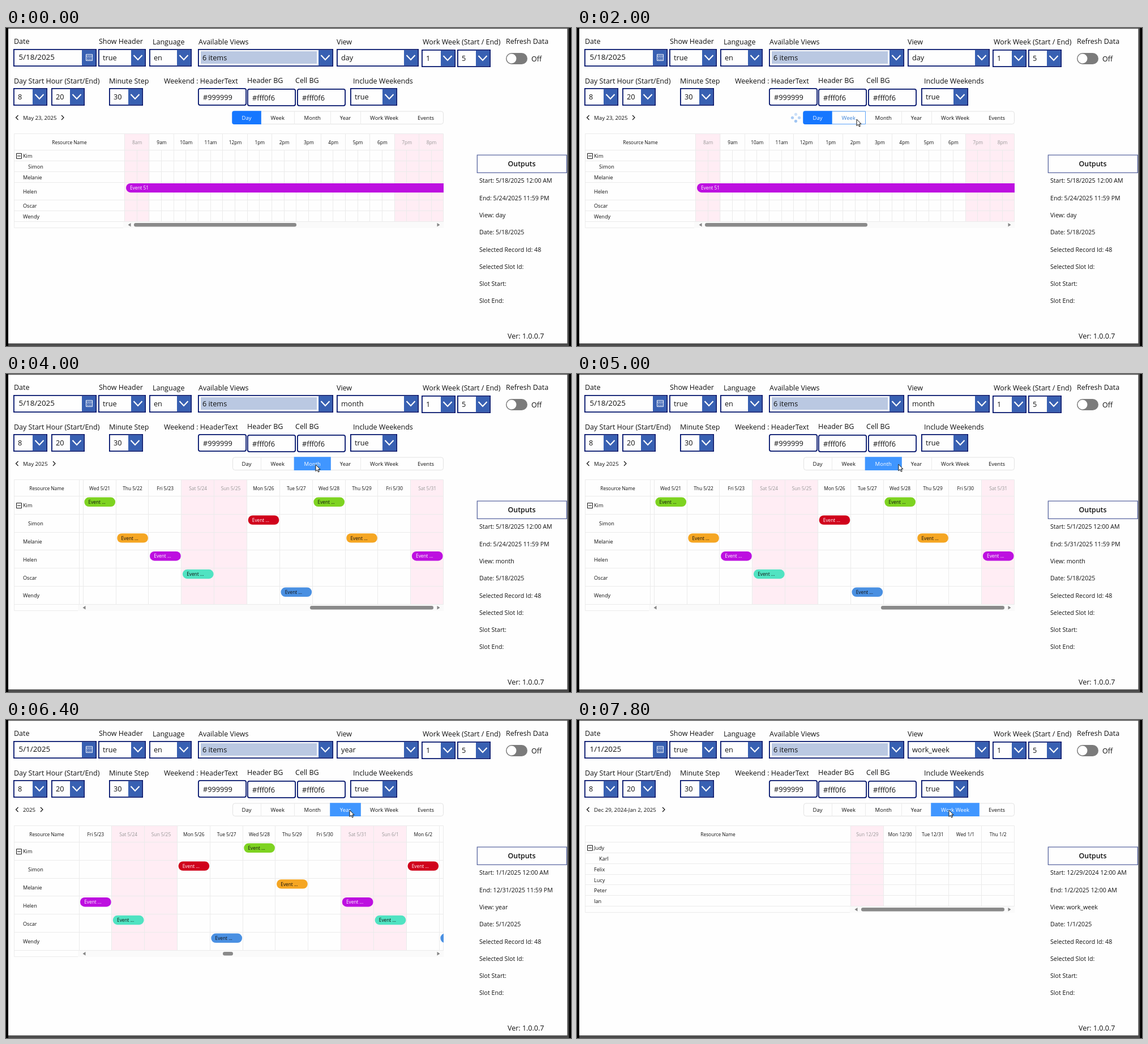
An HTML page with a canvas for the animation above (8 s loop, 998 px wide and 561 px high).

```html
<!DOCTYPE html>
<html lang="en">
<head>
<meta charset="utf-8">
<title>Scheduler views</title>
<style>
  html, body { margin: 0; width: 100%; height: 100%; overflow: hidden; background: #fefefe; }
  canvas { display: block; }
</style>
</head>
<body>
<canvas id="stage" width="998" height="561"></canvas>
<script>
const ctx = document.getElementById('stage').getContext('2d');
const LOOP = 8000;
const NAVY = '#00126b', BLUE = '#3860b2', LINE = '#ebebeb', PINK = '#ffedf4', INK = '#111';
const RIGHT = 773, HEAD_TOP = 187, BODY_TOP = 216;

const team = ['Kim', 'Simon', 'Melanie', 'Helen', 'Oscar', 'Wendy'];
const otherTeam = ['Judy', 'Karl', 'Felix', 'Lucy', 'Peter', 'Ian'];

// One entry per team row; days are counted from Sunday 18 May 2025.
const events = [
  { id: 49, color: '#7ed321', days: [3, 10] },
  { id: 47, color: '#d0021b', days: [0, 8, 15], light: true },
  { id: 50, color: '#f5a623', days: [4, 11] },
  { id: 51, color: '#bd10e0', days: [5, 13], light: true },
  { id: 52, color: '#50e3c2', days: [6, 14] },
  { id: 48, color: '#4a90e2', days: [1, 9, 16] }
];

const evenRows = height => Array.from({ length: 7 }, (_, i) => BODY_TOP + i * height);
const tall = evenRows(31.8), low = evenRows(18.85);

const DAY = { name: 'day', date: '5/18/2025', title: 'May 23, 2025', next: 100, left: 210, x0: 210, w: 43.32, n: 13,
  hours: true, rows: [216, 235, 254, 273, 304, 323, 342], names: team, thumb: [226, 513] };
const WEEK = { name: 'week', date: '5/23/2025', title: 'May 18-24, 2025', next: 116, left: 136, x0: 136, w: 90.95, n: 7,
  day0: 0, rows: tall, names: team };
const MONTH = { name: 'month', date: '5/18/2025', title: 'May 2025', next: 85, left: 130, x0: 136.7, w: 57.85, n: 11,
  day0: 3, rows: tall, names: team, thumb: [537, 755] };
const YEAR = { name: 'year', date: '5/1/2025', title: '2025', next: 63, left: 130, x0: 129.3, w: 57.85, n: 12,
  day0: 5, rows: tall, names: team, thumb: [383, 401] };
const WORK = { name: 'work_week', date: '1/1/2025', title: 'Dec 29, 2024-Jan 2, 2025', next: 153, left: 484, x0: 484,
  w: 57.7, n: 5, day0: -140, rows: low, names: otherTeam, thumb: [502, 755] };

const tabs = [['Day', 400, 450], ['Week', 450, 509.5], ['Month', 509.5, 573], ['Year', 573, 626],
  ['Work Week', 626, 710], ['Events', 710, 773]];

// Timelines: [start time, value]
const viewAt = [[0, DAY], [2400, WEEK], [3800, MONTH], [6000, YEAR], [7400, WORK]];
const tabAt = [[0, 0], [2200, 1], [3500, 2], [5400, 3], [7000, 4]];
const busyAt = [[0, false], [1800, true], [2400, false], [3400, true], [3800, false],
  [5300, true], [6000, false], [7000, true], [7400, false]];
const rangeAt = [
  [0, ['5/18/2025 12:00 AM', '5/24/2025 11:59 PM']],
  [4200, ['5/1/2025 12:00 AM', '5/31/2025 11:59 PM']],
  [6200, ['1/1/2025 12:00 AM', '12/31/2025 11:59 PM']],
  [7600, ['12/29/2024 12:00 AM', '1/2/2025 12:00 AM']]
];
const cursorPath = [[1200, 560, 330], [1800, 494, 161], [2800, 494, 161], [3200, 525, 171], [3500, 545, 160],
  [4000, 547, 160], [4800, 548, 160], [5300, 604, 158], [5600, 604, 158], [6400, 607, 159],
  [6700, 607, 159], [7000, 655, 159], [7800, 657, 159]];

const pick = (timeline, t) => timeline.findLast(([start]) => start <= t)[1];

function cursorPos(t) {
  const i = cursorPath.findLastIndex(([time]) => time <= t);
  if (i < 0) return null;
  const a = cursorPath[i], b = cursorPath[i + 1] || a;
  const p = a === b ? 0 : (t - a[0]) / (b[0] - a[0]);
  const ease = p * p * (3 - 2 * p);
  return [a[1] + (b[1] - a[1]) * ease, a[2] + (b[2] - a[2]) * ease];
}

// Hover strength of a tab, softened over the last 300 ms.
function hoverOf([, x1, x2], t) {
  let sum = 0;
  for (let k = 0; k < 6; k++) {
    const p = cursorPos(t - k * 60);
    if (p && p[0] >= x1 && p[0] < x2 && p[1] > 147 && p[1] < 170) sum++;
  }
  return sum / 6;
}

const mix = (a, b, p) => `rgb(${a.map((v, i) => Math.round(v + (b[i] - v) * p))})`;

function text(str, x, midY, size, { color = INK, align = 'left', weight = 400 } = {}) {
  ctx.font = `${weight} ${size}px "Open Sans", sans-serif`;
  ctx.fillStyle = color;
  ctx.textAlign = align;
  ctx.fillText(str, x, midY + size * 0.36);
}

function rect(x1, y1, x2, y2, color) {
  ctx.fillStyle = color;
  ctx.fillRect(x1, y1, x2 - x1, y2 - y1);
}

function pill(x, y, w, h, radius, color) {
  ctx.beginPath();
  ctx.roundRect(x, y, w, h, radius);
  ctx.fillStyle = color;
  ctx.fill();
}

function frame(x1, y1, x2, y2, color, width, radius = 0) {
  ctx.beginPath();
  ctx.roundRect(x1 + width / 2, y1 + width / 2, x2 - x1 - width, y2 - y1 - width, radius);
  ctx.strokeStyle = color;
  ctx.lineWidth = width;
  ctx.stroke();
}

function poly(points, color, width) {
  ctx.beginPath();
  points.forEach(([x, y]) => ctx.lineTo(x, y));
  ctx.strokeStyle = color;
  ctx.lineWidth = width;
  ctx.stroke();
}

const hLine = (x1, x2, y) => rect(x1, Math.round(y) - 1, x2, Math.round(y), LINE);
const vLine = (x, y1, y2) => rect(Math.round(x) - 1, y1, Math.round(x), y2, LINE);

function dot(x, y, r, color) {
  ctx.beginPath();
  ctx.arc(x, y, r, 0, Math.PI * 2);
  ctx.fillStyle = color;
  ctx.fill();
}

function dropdown(x1, y1, x2, value) {
  const cx = x2 - 14, cy = y1 + 15;
  frame(x1, y1, x2, y1 + 31, NAVY, 1.8);
  rect(x2 - 26, y1 + 2, x2 - 2, y1 + 29, BLUE);
  poly([[cx - 7.5, cy - 4], [cx, cy + 4], [cx + 7.5, cy - 4]], '#fff', 2.1);
  text(value, x1 + 8, cy + 0.5, 12.7);
}

function input(x, y, value) {
  frame(x, y, x + 86, y + 31, NAVY, 1.8, 3);
  text(value, x + 9, y + 16.5, 12.7);
}

function drawForm(view) {
  const labels = [['Date', 14, 23.5], ['Show Header', 164, 23.5], ['Language', 259, 24.5], ['Available Views', 340, 24.5],
    ['View', 584, 24.5], ['Work Week (Start / End)', 736, 24.5], ['Refresh Data', 883, 23.5],
    ['Day Start Hour (Start/End)', 14, 93.5], ['Minute Step', 182, 93.5], ['Weekend : HeaderText', 279, 93.5],
    ['Header BG', 426, 92.5], ['Cell BG', 511, 92.5], ['Include Weekends', 613, 93.5]];
  labels.forEach(([str, x, y]) => text(str, x, y, 12.5));

  frame(13, 37, 160, 68, NAVY, 1.8);
  rect(134, 39, 158, 66, BLUE);
  frame(141, 46, 153, 58, '#fff', 1);
  rect(141, 49, 153, 50, '#fff');
  for (let i = 0; i < 6; i++) rect(143 + i % 3 * 3, 52 + (i > 2) * 3, 145 + i % 3 * 3, 53 + (i > 2) * 3, '#fff');
  text(view.date, 22.5, 51.5, 13.4);

  dropdown(163, 37, 247, 'true');
  dropdown(253, 37, 328, 'en');
  rect(344, 41, 549, 63, '#bac8e2');
  dropdown(339, 37, 578, '6 items');
  dropdown(584, 37, 729, view.name);
  dropdown(734, 38, 794, '1');
  dropdown(797, 38, 856, '5');
  dropdown(13, 106, 73, '8');
  dropdown(80, 106, 139, '20');
  dropdown(182, 106, 242, '30');
  dropdown(608, 106, 691, 'true');
  input(339, 106, '#999999');
  input(426, 107, '#fff0f6');
  input(514, 107, '#fff0f6');

  pill(883, 44, 38, 20, 10, '#7b7b7b');
  dot(893, 54, 8.5, '#fff');
  text('Off', 928, 54, 12.5);
}

function drawOutputs(view, [start, end]) {
  frame(831.7, 223.5, 991, 256, '#5966a0', 1.3);
  text('Outputs', 911, 240, 12.4, { align: 'center', weight: 600 });
  [`Start: ${start}`, `End: ${end}`, `View: ${view.name}`, `Date: ${view.date}`, 'Selected Record Id: 48',
    'Selected Slot Id:', 'Slot Start:', 'Slot End:']
    .forEach((str, i) => text(str, 836, 269.5 + i * 30.3, 10.65));
  text('Ver: 1.0.0.7', 886, 543, 12.5);
}

function drawTabs(t, view) {
  poly([[21.5, 154], [17.5, 158], [21.5, 162]], INK, 1.2);
  poly([[view.next - 2, 154], [view.next + 2, 158], [view.next - 2, 162]], INK, 1.2);
  text(view.title, 30, 158.5, 9.7);

  frame(400, 146.5, RIGHT, 170, '#e2e2e2', 1, 4);
  tabs.slice(1, 5).forEach(([, x]) => vLine(x + 0.5, 147, 170));
  const active = pick(tabAt, t);
  tabs.forEach((tab, i) => {
    const [label, x1, x2] = tab, hover = hoverOf(tab, t);
    const selected = i === active;
    if (selected) {
      pill(x1 - 0.8, 146.2, x2 - x1 + 1.6, 23.9, i ? 0 : [4, 0, 0, 4], mix([22, 119, 255], [64, 150, 255], hover));
    } else if (hover) {
      frame(x1, 146.5, x2 + 0.5, 170, mix([226, 226, 226], [64, 150, 255], hover), 1);
    }
    const color = selected ? '#fff' : mix([17, 17, 17], [64, 150, 255], hover);
    text(label, (x1 + x2) / 2, 158.5, 9.5, { color, align: 'center' });
  });
}

function drawSpinner(t) {
  for (let i = 0; i < 4; i++) {
    const angle = (t - 2000) / 1178 * Math.PI * 2 + i * Math.PI / 2;
    const alpha = 0.32 + 0.12 * Math.sin(t / 320 + i * 1.3);
    dot(386.5 + 6 * Math.cos(angle), 158.3 + 6 * Math.sin(angle), 2.6, `rgba(40, 125, 230, ${alpha})`);
  }
}

function columnOf(view, i) {
  if (view.hours) {
    const hour = 8 + i;
    return { label: `${hour % 12 || 12}${hour < 12 ? 'am' : 'pm'}`, muted: hour < 9 || hour > 18 };
  }
  const date = new Date(Date.UTC(2025, 4, 18 + view.day0 + i)), weekday = date.getUTCDay();
  const name = ['Sun', 'Mon', 'Tue', 'Wed', 'Thu', 'Fri', 'Sat'][weekday];
  return { label: `${name} ${date.getUTCMonth() + 1}/${date.getUTCDate()}`, muted: weekday % 6 === 0 };
}

function drawEvents(view) {
  events.forEach(({ id, color, days, light }, row) => {
    const y = view.rows[row] + 1.6, ink = { color: light ? '#fff' : INK };
    if (view.hours) {
      if (id !== 51) return;
      pill(212, y - 0.6, RIGHT - 212, 16.2, [8, 0, 0, 8], color);
      text('Event 51', 219, y + 7.9, 8.3, ink);
      return;
    }
    days.forEach(day => {
      const x = view.x0 + (day - view.day0) * view.w + 1.7;
      pill(x, y, view.w - 3.2, 16.4, 8, color);
      text(view === WEEK ? `Event ${id}` : 'Event ...', x + 7.2, y + 8.4, 8.3, ink);
    });
  });
}

function drawScrollbar([x1, x2], left, top) {
  const y = top + 5.3;
  rect(left, top, RIGHT, top + 11, '#fafafa');
  pill(x1, y - 3.2, x2 - x1, 6.4, 3.2, '#8a8a8a');
  [[left + 11, -1], [764, 1]].forEach(([x, dir]) => {
    ctx.beginPath();
    ctx.moveTo(x + 2.5 * dir, y);
    ctx.lineTo(x - 2.5 * dir, y - 3.2);
    ctx.lineTo(x - 2.5 * dir, y + 3.2);
    ctx.fillStyle = '#858585';
    ctx.fill();
  });
}

function drawCalendar(view) {
  const { left, x0, w, n, rows, names, thumb } = view;
  const bodyEnd = rows[6], bottom = Math.round(bodyEnd + (thumb ? 11 : 0));

  ctx.save();
  ctx.beginPath();
  ctx.rect(left, HEAD_TOP, RIGHT - left, bottom - HEAD_TOP);
  ctx.clip();
  for (let i = 0; i < n; i++) {
    const x = x0 + i * w, { label, muted } = columnOf(view, i);
    if (muted) rect(x, HEAD_TOP, x + w, bodyEnd, PINK);
    vLine(x, HEAD_TOP, bodyEnd);
    if (view.hours) vLine(x + w / 2, BODY_TOP, bodyEnd);
    text(label, x + w / 2, 201.5, 8.4, { align: 'center', color: muted ? '#999' : INK });
  }
  ctx.restore();

  rows.forEach(y => hLine(14, RIGHT, y));
  frame(14, HEAD_TOP - 1, RIGHT, bottom, LINE, 1);
  vLine(left, HEAD_TOP, bottom);
  text('Resource Name', (14 + left) / 2, 201.5, 8.35, { align: 'center' });

  names.forEach((name, i) => {
    const y = (rows[i] + rows[i + 1]) / 2 + 0.3;
    text(name, i === 1 ? 39 : 30, y, 9.1);
    if (i) return;
    frame(18, y - 5, 28, y + 5, INK, 1);
    rect(20, y - 0.5, 26, y + 0.5, INK);
  });

  ctx.save();
  ctx.beginPath();
  ctx.rect(left, BODY_TOP, RIGHT - left, bodyEnd - BODY_TOP);
  ctx.clip();
  if (names === team) drawEvents(view);
  ctx.restore();
  if (thumb) drawScrollbar(thumb, left - (view === WORK ? 2 : 3), Math.round(bodyEnd));
}

function drawCursor([x, y]) {
  ctx.beginPath();
  [[0, 0], [0, 11.5], [2.7, 9], [4.5, 13], [6.3, 12.2], [4.6, 8.3], [8, 8.3]]
    .forEach(([dx, dy]) => ctx.lineTo(x + dx, y + dy));
  ctx.closePath();
  ctx.fillStyle = '#fff';
  ctx.fill();
  ctx.strokeStyle = '#111';
  ctx.lineWidth = 1;
  ctx.stroke();
}

function drawBackdrop() {
  rect(0, 0, 998, 561, '#000');
  rect(4, 0, 994.5, 561, '#4b4b4b');
  rect(4, 1.3, 991.4, 556.4, '#fefefe');
}

function draw(now) {
  const t = now % LOOP, view = pick(viewAt, t), cursor = cursorPos(t);
  drawBackdrop();
  drawForm(view);
  drawTabs(t, view);
  drawCalendar(view);
  drawOutputs(view, pick(rangeAt, t));
  if (pick(busyAt, t)) drawSpinner(t);
  if (cursor) drawCursor(cursor);
}

const begin = performance.now();
function tick() {
  draw(performance.now() - begin);
  requestAnimationFrame(tick);
}
tick();
</script>
</body>
</html>
```
